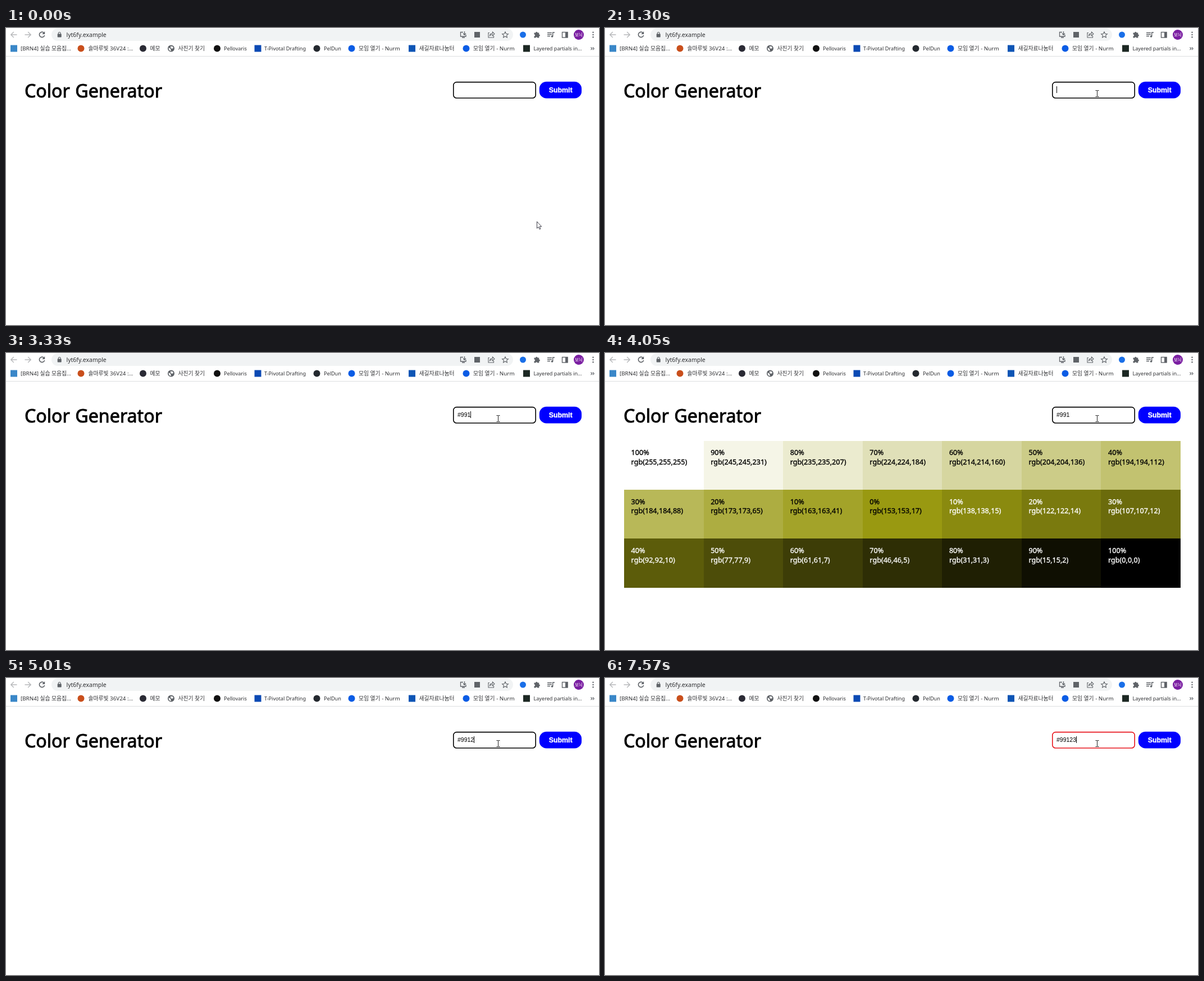
An HTML page that plays this animation: 1056x530 px, repeating every 8 s.

```html
<!DOCTYPE html>
<html lang="ko">
<head>
<meta charset="utf-8">
<title>Color Generator</title>
<style>
  html, body { margin: 0; width: 100%; height: 100%; overflow: hidden; background: #fff; }
  svg { display: block; font-family: 'Noto Sans', 'Noto Sans CJK KR', sans-serif; }
  .line { fill: none; stroke: #5f6368; stroke-width: 1.4; }
  .arial { font-family: 'Liberation Sans', Arial, sans-serif; }
  /* regular weight plus a thin outline gives a semibold */
  #title { font-size: 32.2px; stroke: #000; stroke-width: .9; word-spacing: 1px; }
  #grid text { font-size: 12.6px; stroke-width: .35; }
  #grid rect { shape-rendering: crispEdges; }
</style>
</head>
<body>
<svg width="1056" height="530" viewBox="0 0 1056 530">
  <rect width="1056" height="530" fill="#fff"/>

  <!-- toolbar -->
  <rect x="81" y="1" width="822" height="22" rx="11" fill="#f1f3f4"/>
  <path class="line" style="stroke:#b6b8ba" d="M19.5 12H9M13.8 7L8.8 12l5 5"/>
  <path class="line" style="stroke:#b6b8ba" d="M33.5 12H44M39.2 7l5 5-5 5"/>
  <path class="line" style="stroke-width:1.6" d="M67.6 8.6A4.7 4.7 0 1 0 68.7 13"/>
  <path d="M69.2 6v5h-5z" fill="#5f6368"/>
  <rect x="91.7" y="10.5" width="7" height="6" rx=".8" fill="#5f6368"/>
  <path class="line" style="stroke-width:1.2" d="M93.3 11V9.4a1.9 1.9 0 0 1 3.8 0V11"/>
  <text x="107.5" y="16" font-size="10.5" fill="#303134">lyt6fy.example</text>

  <path class="line" style="stroke-width:1.3" d="M814 7.5h-4.5v7.5h9.5v-3M812 17h5M816.5 6v6M814 9.8l2.5 2.5 2.5-2.5"/>
  <rect x="834" y="7" width="10" height="10" fill="#5f6368"/>
  <path class="line" style="stroke-width:1.1" d="M861 8.5h-2v8.5h9.5v-3M861.5 13.5c.5-3 2.5-4 5-4V7l3.5 3.5-3.5 3.5v-2.3c-2 0-3.5.4-5 1.8z"/>
  <path class="line" style="stroke-width:1.1" d="M889 6.7l1.6 3.5 3.8.4-2.8 2.6.8 3.8-3.4-2-3.4 2 .8-3.8-2.8-2.6 3.8-.4z"/>
  <circle cx="920.5" cy="12" r="5.5" fill="#1a6fe8"/>
  <path fill="#5f6368" d="M940.5 8.5h2.7a1.7 1.7 0 0 1 3.4 0h2.7v2.9a1.7 1.7 0 0 1 0 3.4v2.7h-3a1.6 1.6 0 0 0-3.1 0h-2.7v-3a1.6 1.6 0 0 0 0-3.2z"/>
  <path class="line" d="M964 8.5h8M964 11.5h8M964 14.5h5M973.7 15V8H977"/>
  <circle cx="972.5" cy="15" r="1.8" fill="#5f6368"/>
  <rect class="line" x="990.5" y="7.5" width="9.5" height="9.5"/>
  <rect x="996" y="7" width="4.5" height="10" fill="#5f6368"/>
  <circle cx="1020" cy="12" r="9" fill="#7b1fa2"/>
  <text x="1020" y="14.7" font-size="7.5" fill="#fff" text-anchor="middle">보늬</text>
  <g fill="#5f6368">
    <circle cx="1045.5" cy="7.7" r="1.2"/><circle cx="1045.5" cy="12" r="1.2"/><circle cx="1045.5" cy="16.3" r="1.2"/>
  </g>
  <g id="marks"></g>
  <path class="line" style="stroke-width:1.2" d="M1041.5 34.5l2.3 2.3-2.3 2.3M1044.8 34.5l2.3 2.3-2.3 2.3"/>
  <rect y="50" width="1056" height="1" fill="#dcdee0"/>

  <!-- page -->
  <text id="title" x="33" y="124">Color Generator</text>
  <rect id="field" x="796.8" y="96.6" width="146.4" height="28.4" rx="5.5" fill="#fff" stroke-width="1.6"/>
  <text id="value" class="arial" x="804" y="114" font-size="10.5"></text>
  <rect id="caret" y="104" width="1" height="12"/>
  <rect x="949.8" y="95.8" width="75.2" height="29.7" rx="12.6" fill="#00f"/>
  <text class="arial" x="987.7" y="114.6" font-size="12.4" font-weight="700" fill="#fff" stroke="#fff" stroke-width=".3" text-anchor="middle">Submit</text>
  <g id="grid"></g>

  <!-- pointers -->
  <path id="arrow" d="M.5.5v12l2.7-2.5 1.9 4.2 1.9-.8-1.9-4.1H8.7z" fill="#fff" stroke="#2a2a36" stroke-width=".9"/>
  <path id="beam" d="M-3-5.5H-.5L0-5l.5-.5H3M0-5V5M-3 5.5H-.5L0 5l.5.5H3" fill="none" stroke="#222" stroke-width="1"/>
</svg>
<script>
const NS = 'http://www.w3.org/2000/svg';
const $ = id => document.getElementById(id);

function add(parent, tag, attrs, text = '') {
  const el = document.createElementNS(NS, tag);
  for (const key in attrs) el.setAttribute(key, attrs[key]);
  el.textContent = text;
  parent.append(el);
}

// Bookmarks: icon shape, icon centre, colour, label start, label
const bookmarks = [
  ['square', 14, '#3a87c8', 26, '[BRN4] 실습 모음집...'],
  ['circle', 133.5, '#c94f1c', 146.5, '솔마루빛 36V24 :...'],
  ['circle', 244, '#2b2b35', 256.5, '메모'],
  ['globe', 294, '#5f6368', 306.5, '사진기 찾기'],
  ['circle', 376, '#111', 388, 'Pellovaris'],
  ['square', 448.5, '#0c4ab4', 460, 'T-Pivotal Drafting'],
  ['circle', 553.5, '#24292f', 566, 'PelDun'],
  ['circle', 615.5, '#0b5ce5', 628, '모임 열기 - Nurm'],
  ['square', 723, '#0d55b5', 735.5, '새길자료나눔터'],
  ['circle', 819.5, '#0b5ce5', 832, '모임 열기 - Nurm'],
  ['square', 927, '#1c2823', 939.5, 'Layered partials in...'],
];
for (const [shape, x, fill, left, label] of bookmarks) {
  const box = $('marks');
  if (shape === 'square') add(box, 'rect', { x: x - 6, y: 30.5, width: 12, height: 12, fill });
  else add(box, 'circle', { cx: x, cy: 36.5, r: 6, fill });
  if (shape === 'globe') {
    add(box, 'path', { d: 'M290 35l3 2 1 4c-3 0-5-3-4-6zM293 32.5l4 .5 1 3-3 1-2-2z', fill: '#fff' });
  }
  const size = /[가-힣]/.test(label) ? 9.8 : 9.1;
  add(box, 'text', { x: left, y: 40, 'font-size': size, fill: '#303134' }, label);
}

// Tints run from white to the base colour, shades from there to black
const base = [153, 153, 17];
const cellW = 991 / 7, cellH = 87.3;
for (let i = 0; i < 21; i++) {
  const x = 34 + (i % 7) * cellW;
  const y = 156.6 + Math.floor(i / 7) * cellH;
  const percent = Math.abs(10 - i) * 10;
  const end = i > 10 ? 0 : 255;
  const rgb = `rgb(${base.map(v => Math.round(v + (end - v) * percent / 100))})`;
  const ink = i > 10 ? '#fff' : '#000';
  const label = (dy, text) => add($('grid'), 'text', { x: x + 12.6, y: y + dy, fill: ink, stroke: ink }, text);
  add($('grid'), 'rect', { x, y, width: cellW, height: cellH, fill: rgb });
  label(25.7, percent + '%');
  label(42.5, rgb);
}

const start = { arrow: [945, 345], beam: null, text: '', caret: false, table: false, border: '#000' };
const steps = [
  [70, { arrow: [945, 335] }],
  [250, { arrow: [939, 310] }],
  [340, { arrow: [923, 262] }],
  [430, { arrow: [912, 224] }],
  [570, { arrow: [912, 218] }],
  [710, { arrow: [907, 198] }],
  [780, { arrow: [897, 166] }],
  [850, { arrow: [885, 134] }],
  [920, { arrow: null, beam: [876.5, 117] }],
  [990, { beam: [881.5, 120] }],
  [1180, { beam: [876.5, 117] }],
  [1300, { caret: true }],
  [1980, { caret: false }],
  [2570, { text: '#', caret: true }],
  [3050, { text: '#9' }],
  [3110, { text: '#99' }],
  [3330, { text: '#991' }],
  [4050, { table: true, caret: false }],
  [4390, { caret: true }],
  [4920, { caret: false }],
  [5010, { text: '#9912', table: false, caret: true }],
  [5590, { caret: false }],
  [6030, { caret: true }],
  [6440, { border: '#e8141c' }],
  [6570, { caret: false }],
  [7100, { caret: true }],
  [7570, { text: '#99123' }],
];

const show = (id, on) => $(id).setAttribute('visibility', on ? 'visible' : 'hidden');

function place(id, pos) {
  show(id, pos);
  if (pos) $(id).setAttribute('transform', `translate(${pos})`);
}

function draw(time) {
  const s = { ...start };
  for (const [at, change] of steps) if (time >= at) Object.assign(s, change);
  place('arrow', s.arrow);
  place('beam', s.beam);
  show('caret', s.caret);
  show('grid', s.table);
  $('value').textContent = s.text;
  $('caret').setAttribute('x', Math.floor(804 + s.text.length * 5.84));
  $('field').setAttribute('stroke', s.border);
}

const origin = performance.now();
function tick() {
  draw((performance.now() - origin) % 8000);
  requestAnimationFrame(tick);
}
tick();
</script>
</body>
</html>
```
